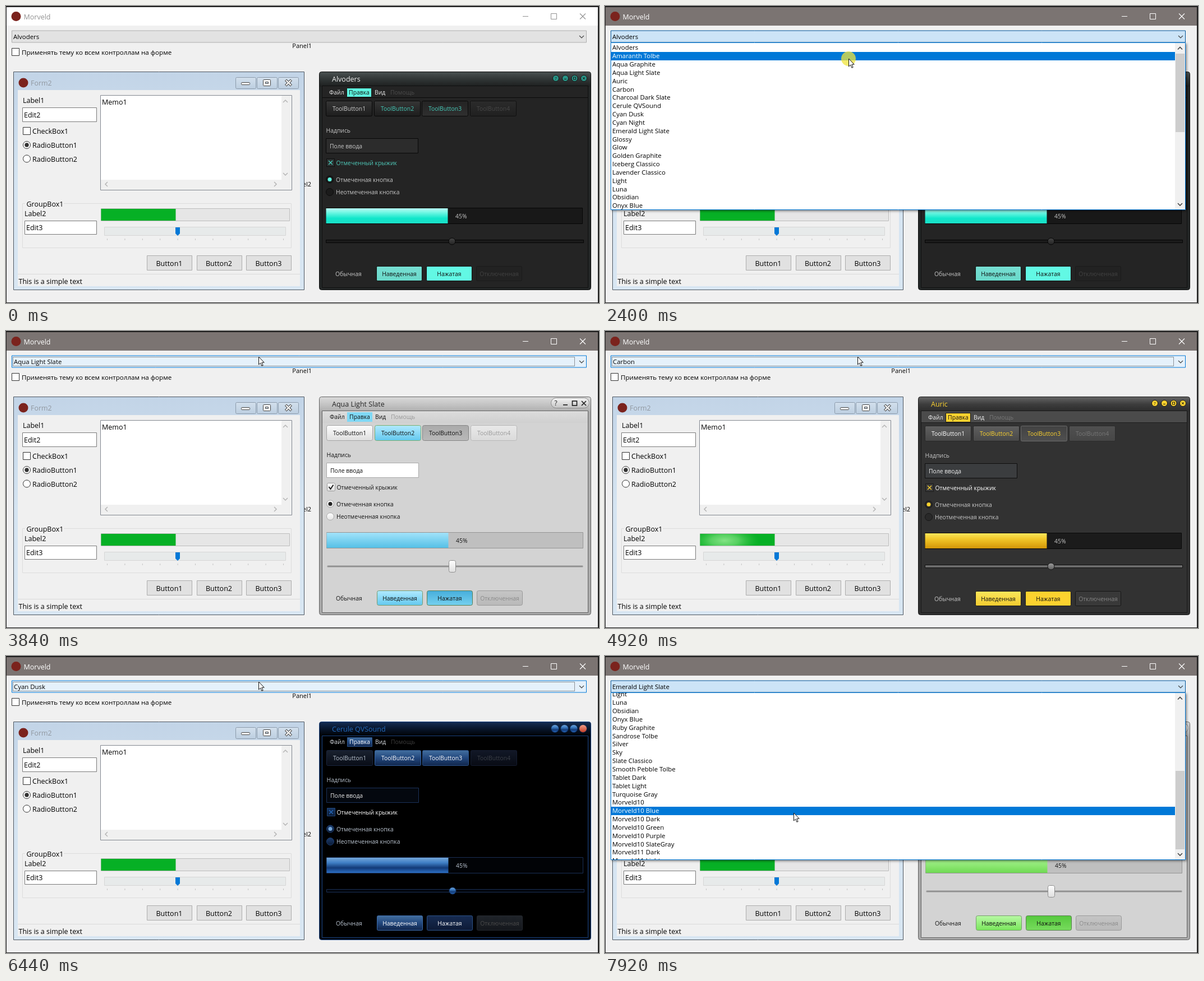
An HTML page with a canvas that plays this animation: 1057 px wide and 530 px high, repeating every 8000 ms.

```html
<!DOCTYPE html>
<html lang="ru">
<head>
<meta charset="utf-8">
<title>Theme preview</title>
<style>
html, body { margin: 0; width: 100%; height: 100%; overflow: hidden; background: #1c1c1c; }
canvas { display: block; width: 1057px; height: 530px; }
</style>
</head>
<body>
<canvas id="stage" width="1057" height="530"></canvas>
<script>
const ctx = document.getElementById('stage').getContext('2d');
const LOOP = 8000, TICK = 40, ROW = 14.84, LIST_TOP = 66.7;
const BLUE = '#0078d7';

const names = ['Alvoders', 'Amaranth Tolbe', 'Aqua Graphite', 'Aqua Light Slate', 'Auric', 'Carbon',
  'Charcoal Dark Slate', 'Cerule QVSound', 'Cyan Dusk', 'Cyan Night', 'Emerald Light Slate', 'Glossy',
  'Glow', 'Golden Graphite', 'Iceberg Classico', 'Lavender Classico', 'Light', 'Luna', 'Obsidian',
  'Onyx Blue', 'Ruby Graphite', 'Sandrose Tolbe', 'Silver', 'Sky', 'Slate Classico',
  'Smooth Pebble Tolbe', 'Tablet Dark', 'Tablet Light', 'Turquoise Gray', 'Morveld10',
  'Morveld10 Blue', 'Morveld10 Dark', 'Morveld10 Green', 'Morveld10 Purple', 'Morveld10 SlateGray',
  'Morveld11 Dark', 'Morveld11 Light'];

// ---- drawing helpers ----
function paint(fill, y, h) {
  if (!Array.isArray(fill)) return fill;
  const g = ctx.createLinearGradient(0, y, 0, y + h);
  fill.forEach((c, i) => g.addColorStop(i / (fill.length - 1), c));
  return g;
}
function box(x, y, w, h, fill, stroke, r = 0) {
  ctx.beginPath();
  if (stroke) ctx.roundRect(x + .5, y + .5, w - 1, h - 1, r);
  else ctx.roundRect(x, y, w, h, r);
  if (fill) { ctx.fillStyle = paint(fill, y, h); ctx.fill(); }
  if (stroke) { ctx.strokeStyle = stroke; ctx.lineWidth = 1; ctx.stroke(); }
}
function disc(x, y, r, fill, stroke) {
  ctx.beginPath();
  ctx.arc(x, y, r, 0, 7);
  if (fill) { ctx.fillStyle = paint(fill, y - r, 2 * r); ctx.fill(); }
  if (stroke) { ctx.strokeStyle = stroke; ctx.lineWidth = 1; ctx.stroke(); }
}
function lines(color, width, ...paths) {
  ctx.strokeStyle = color;
  ctx.lineWidth = width;
  ctx.beginPath();
  for (const p of paths)
    for (let i = 0; i < p.length; i += 2) ctx[i ? 'lineTo' : 'moveTo'](p[i], p[i + 1]);
  ctx.stroke();
}
// y is the middle of the capitals
function text(s, x, y, size, color, align = 'left') {
  ctx.font = `${size}px "Open Sans", "Noto Sans", sans-serif`;
  ctx.textAlign = align;
  ctx.fillStyle = color;
  ctx.fillText(s, x, y + size * .36);
}
function chevron(x, y, dx, dy, color, w = 1.2) {
  lines(color, w, dx ? [x - 2 * dx, y - 4, x + 2 * dx, y, x - 2 * dx, y + 4]
                     : [x - 4, y - 2 * dy, x, y + 2 * dy, x + 4, y - 2 * dy]);
}
function cross(x, y, r, color, w) {
  lines(color, w, [x - r, y - r, x + r, y + r], [x - r, y + r, x + r, y - r]);
}

// ---- themes: parts are [fill, border, text] ----
const graphite = (accent, fill, more) => ({
  o: 0, r: 2, frame: '#303030', edge: '#191919', bar: ['#646464', '#3c3c3c', '#2b2b2b'],
  bg: '#323232', menu: '#4b4b4b', line: '#1d1d1d', title: accent, sel: accent, selEdge: '#1b1b1b',
  selFg: '#111', fg: '#c6c6c6', menuFg: '#f0f0f0', checkFg: '#fff', dis: '#777',
  tools: [[['#5f5f5f', '#484848'], '#272727', '#fff'], [['#5f5f5f', '#484848'], '#272727', accent],
          [['#424242', '#505050'], '#6a6a6a', accent], [['#505050', '#464646'], '#2c2c2c', '#777']],
  edit: ['#3b3d3f', '#0e0e0e', '#eee'], chk: ['#3a3a3a', '#191919'], mark: accent, dot: accent,
  radio: ['#292929', '#171717'], track: ['#1b1b1b', '#080808'], fill,
  rail: ['#6c6c6c', '#111'], thumb: [['#9c9c9c', '#606060'], '#151515'], icons: 'dot', icon: accent,
  btns: [[fill.slice(0, 2), '#1b1b1b', '#111'], [accent, '#1b1b1b', '#111'], ['#393939', '#161616', '#858585']],
  ...more
});
const slate = (accent, hot, press, fill) => ({
  o: 1, r: 3, light: 1, frame: '#a9a9a9', edge: '#626262', bar: ['#d9d9d9', '#c4c4c4', '#adadad'],
  bg: '#d3d3d3', menu: ['#dcdcdc', '#d0d0d0'], line: '#cfcfcf', title: '#252525', sel: accent,
  selFg: '#111', fg: '#151515', menuFg: '#111', dis: '#999',
  tools: [[['#fdfdfd', '#dedede'], '#a5a5a5', '#111'], [hot, '#7aae6f', '#111'],
          [['#aaa', '#b9b9b9'], '#858585', '#111'], [['#e9e9e9', '#dadada'], '#b8b8b8', '#999']],
  edit: ['#fff', '#a9a9a9', '#111'], chk: [['#fff', '#ddd'], '#999'], mark: '#222', tick: 1, dot: '#222',
  radio: [['#fff', '#dadada'], '#a3a3a3'], track: ['#bfbfbf', '#959595'], fill,
  rail: ['#909090', '#b5b5b5'], thumb: [['#fff', '#dedede'], '#8d8d8d'], icons: 'pill', icon: '#222',
  btns: [[hot, '#769a6d', '#111'], [press, '#587e50', '#111'], [['#c5c5c5', '#b9b9b9'], '#999', '#8b8b8b']]
});
const night = (title, hot, fill, more) => ({
  o: 1, r: 2, frame: '#02060e', edge: '#1a427f', bar: ['#142c52', '#071428', '#000'], bg: '#000', menu: '#000',
  line: '#000', title, sel: hot, selEdge: '#28528c', selFg: '#fff', fg: '#b9c3cf', menuFg: '#d7dce2',
  checkFg: '#fff', dis: '#3c3c3c',
  tools: [[['#1a2230', '#080c16'], '#1b2640', '#b9c3cf'], [hot, '#33609f', '#fff'],
          [hot, '#2b528a', '#fff'], [['#121827', '#080b14'], '#151d30', '#3c4048']],
  edit: ['#04080f', '#1b325a', '#e6e6e6'], chk: [['#173663', '#0b1a33'], '#21477c'], mark: title, dot: fill[0],
  radio: [['#1c3c6c', '#0b1b36'], '#1c3d70'], track: ['#010306', '#1a2f55'], fill,
  rail: ['#02060d', '#1a2f55'], thumb: [fill, '#173a6c'], icons: 'orb', icon: fill,
  btns: [[hot, '#3c6cab', '#fff'], [['#172c52', '#0d1a36'], '#2c5288', '#fff'], [['#20242a', '#14171c'], '#24282e', '#4a4a4a']],
  ...more
});
const orange = ['#f09461', '#e67a42'];

const themes = [
  graphite('#5ef7e0', ['#b9fff5', '#62f5e0', '#10e6ca', '#1ce0c8'], {
    frame: '#232626', edge: '#0f1010', bar: ['#495050', '#303535', '#1d1f1f'], bg: '#242424', menu: '#242424',
    line: '#0b0b0b', title: '#f2f2f2', menuFg: '#e8e8e8', checkFg: '#4fc9b9', dis: '#4b4b4b',
    tools: [[['#363636', '#1d1d1d'], '#080808', '#ccc'], [['#363636', '#1d1d1d'], '#080808', '#46cbb9'],
            [['#232323', '#2f2f2f'], '#080808', '#46cbb9'], [['#2b2b2b', '#202020'], '#101010', '#484848']],
    edit: ['#2c2c2c', '#080808', '#c6c6c6'], chk: ['#2b3030', '#0d0d0d'], mark: '#46cbb9', radio: ['#1b1b1b', '#0c0c0c'],
    track: ['#181818', '#050505'], rail: ['#1b1b1b', '#050505'], thumb: [['#454545', '#232323'], '#050505'], icon: '#299486',
    btns: [[['#77ded2', '#69d9ca'], '#111', '#111'], ['#62f8e4', '#111', '#111'], ['#222', '#1b1b1b', '#424242']]
  }),
  {
    ...slate('#e97a42', orange, ['#ea8149', '#ee8f5c'], ['#ea8753', '#e87c45']),
    frame: '#2c305a', edge: '#1d2040', bar: ['#454a78', '#30355f', '#262a50'], bg: '#e6e9ef', menu: ['#eef0f5', '#d2d8e4'],
    line: '#c2c9d8', title: '#e8ebf6', selEdge: '#8e3c16', selFg: '#fff', dis: '#9a9ea8', label: '#4c4b82',
    tools: [[['#fff', '#edeff4'], '#c4c9d6', '#111'], [orange, '#b65a2b', '#111'],
            [['#c5cbde', '#d8ddea'], '#59628e', '#111'], [['#f6f7f9', '#eceff3'], '#c8cdd6', '#a2a5ac']],
    edit: ['#fff', '#a7aec2', '#111'], chk: [orange, '#a24b20'], mark: '#4a2513', dot: '#fff', radio: [orange, '#b45a2b'],
    track: ['#c9d0df', '#9aa3bd'], rail: ['#8491ad', '#bac4d6'], thumb: [['#fff', '#dce1ea'], '#7e8ba6'],
    icons: 'glyph', icon: '#d8dbea',
    btns: [[orange, '#a9542a', '#111'], [['#ea8149', '#ee8f5c'], '#8f431e', '#111'], ['#e6e9ef', '#bdc3cf', '#9a9ea8']]
  },
  graphite('#5cc4f2', ['#a3e2ff', '#56bdec', '#2389c4']),
  slate('#7fd8f5', ['#b2eaff', '#62c8ee'], ['#45addb', '#76d1ef'], ['#a2e3fa', '#55c0e6']),
  graphite('#fcd22f', ['#fbe75c', '#f2cb2e', '#e4b018', '#d2960a']),
  graphite('#d8d8d8', ['#dedede', '#b5b5b5', '#8c8c8c'], { bg: '#3e3e3e', frame: '#393939' }),
  graphite('#b5bcc4', ['#b9c0c8', '#949ca5', '#727a83'], { bg: '#4a4d50', frame: '#3a3d40', menu: '#56595c' }),
  night('#2469ba', ['#44709f', '#22477d', '#10254a'], ['#74a6d8', '#3f7fc5', '#123a77', '#2c6fc4']),
  night('#1d3c50', ['#8fe0f2', '#42b2cf'], ['#a1ecfa', '#46bfd9', '#2598b6'], {
    frame: '#788b99', edge: '#465966', bar: ['#a4b4bf', '#8498a6', '#758895'], bg: '#91a3b0', menu: '#9aabb7', line: '#788b99',
    fg: '#101a20', menuFg: '#101a20', checkFg: '#101a20', dis: '#6d7d88' }),
  night('#4fd0ea', ['#3f98ad', '#165265', '#0a2f3d'], ['#83e6f7', '#2ba6c3', '#10647c'], { bg: '#0c1820', menu: '#0c1820', frame: '#0a141b' }),
  slate('#98f07c', ['#b9f9a6', '#78e65a'], ['#55c83c', '#78dc5e'], ['#a9f492', '#8ee874', '#6fd953'])
];

// ---- timeline ----
const at = (keys, t) => keys.findLastIndex(k => t >= k);
const labelTimes = [0, 2480, 3280, 3840, 4360, 4920, 5200, 6080, 6440, 6760, 7080];
const themeTimes = [0, 2520, 3360, 3840, 4400, 4960, 5240, 6120, 6480, 6800, 7120];
const glowTimes = [840, 2920, 4920, 7080];
const clicks = [1080, 2400, 7280];
const path = [[200, 597, 385], [1000, 440, 66], [1080, 434, 51], [1760, 434, 51], [1920, 434, 94],
  [2520, 434, 94], [3000, 450, 46], [7400, 450, 46], [7680, 336, 280], [8000, 336, 280]];
const clamp = v => Math.max(0, Math.min(1, v));
const ease = v => v * v * (3 - 2 * v);

function pointer(t) {
  const i = at(path.map(p => p[0]), t);
  if (i < 0) return null;
  const [t0, x0, y0] = path[i], [t1, x1, y1] = path[i + 1];
  const k = ease((t - t0) / (t1 - t0));
  return { x: x0 + (x1 - x0) * k, y: y0 + (y1 - y0) * k };
}
function opening(t) {
  if (t >= 1240 && t < 2480) return clamp((t - 1200) / 240);
  return t >= 7360 ? clamp((t - 7320) / 200) : 0;
}

// ---- scene parts ----
function mainWindow(active, hoverCheck) {
  box(0, 0, 1057, 530, '#1c1c1c');
  box(1, 2, 1054, 527, '#f0f0f0');
  box(1, 2, 1054, 33, active ? '#7b7472' : '#fff');
  const c = active ? '#fff' : '#929292';
  disc(18, 18.5, 8.5, '#7b231d');
  text('Morveld', 31.5, 19, 12.5, c);
  lines(c, 1, [921, 18.5, 931, 18.5]);
  box(971, 13, 11, 11, null, c);
  cross(1028, 18.5, 5, c, 1.1);
  box(10, 75, 14, 14, '#fff', hoverCheck ? BLUE : '#333');
  text('Применять тему ко всем контроллам на форме', 28, 83, 11.6, '#000');
  text('Panel1', 545, 71, 11, '#000', 'right');
  text('Panel2', 544, 318, 11, '#000', 'right');
}

function combo(label, state, focus) {
  const look = { idle: ['#e2e2e2', '#adadad'], hover: ['#e5f1fb', BLUE], open: ['#cce4f7', '#005499'] }[state];
  box(10, 43.5, 1025, 22, ...look);
  if (focus) {
    ctx.setLineDash([1, 1]);
    box(12, 46, 1002, 17, null, '#333');
    ctx.setLineDash([]);
  }
  text(label, focus ? 14 : 13, 55, 11.4, '#000');
  chevron(1026, 55, 0, 1, '#444');
}

function form(t) {
  box(13, 117, 519, 390, ['#c2d4e7', '#d5e4f1', '#d8e6f2'], '#4d5660');
  box(21, 150, 503, 350, '#f0f0f0');
  disc(31, 137, 8.5, '#7b231d');
  text('Form2', 44, 138, 12.4, '#9198a0');
  for (const x of [409, 447, 485]) box(x, 127, 37, 21, ['#d3e0ed', '#bccee0'], '#8c9bab', 2);
  box(419, 136, 16, 5, '#fff', '#444', 1);
  box(458, 131, 14, 12, '#fff', '#444', 1);
  box(462, 135, 6, 4, '#ccd8e4', '#444');
  cross(503.5, 137, 5, '#444', 4.5);
  cross(503.5, 137, 4.5, '#fff', 2.4);

  const label = (s, x, y, align) => text(s, x, y, 12.5, '#000', align);
  label('Label1', 30, 168);
  box(29, 181, 133, 26, '#fff', '#7a7a7a');
  label('Edit2', 32, 194);
  box(30, 216, 14, 14, '#fff', '#333');
  label('CheckBox1', 47, 223);
  disc(37, 248, 6.5, '#fff', '#333');
  disc(37, 248, 3.7, '#333');
  label('RadioButton1', 47, 248);
  disc(37, 272.5, 6.5, '#fff', '#333');
  label('RadioButton2', 47, 273);

  box(168, 159, 342, 170, '#fff', '#828790');
  box(491, 160, 18, 168, '#f0f0f0');
  box(169, 310, 340, 18, '#f0f0f0');
  label('Memo1', 171, 171);
  chevron(498, 170, 0, -1, '#b5b5b5', 1.5);
  chevron(498, 300, 0, 1, '#b5b5b5', 1.5);
  chevron(179, 318, -1, 0, '#b5b5b5', 1.5);
  chevron(480, 318, 1, 0, '#b5b5b5', 1.5);

  box(29, 352, 480, 80, null, '#dcdcdc');
  box(34, 348, 69, 10, '#f0f0f0');
  label('GroupBox1', 36.5, 353);
  label('Label2', 33, 370);
  box(33, 383, 129, 25, '#fff', '#7a7a7a');
  label('Edit3', 36, 395);
  progress(t);
  box(175, 394, 324, 16, '#e7eaea', '#d6d6d6');
  for (let i = 0; i < 11; i++) box(180 + i * 31.4, 415, 1, 3, '#c4c4c4');
  ctx.fillStyle = BLUE;
  ctx.beginPath();
  for (const [x, y] of [[302, 395], [310, 395], [310, 406], [306, 410], [302, 406]]) ctx.lineTo(x, y);
  ctx.fill();
  ['Button1', 'Button2', 'Button3'].forEach((s, i) => {
    const x = 251 + i * 88.5;
    box(Math.round(x), 445, 81, 27, '#e1e1e1', '#adadad');
    label(s, x + 40, 459, 'center');
  });
  lines('#d9d9d9', 1, [21, 478.5, 524, 478.5]);
  label('This is a simple text', 22.5, 491);
}

function progress(t) {
  box(169, 361, 337, 23, '#e6e6e6', '#bcbcbc');
  box(169.5, 362, 133, 21, '#06b025');
  ctx.save();
  ctx.beginPath();
  ctx.rect(169.5, 362, 133, 21);
  ctx.clip();
  for (const g of glowTimes) {
    const x = 213 + (t - g) * .3;
    if (x < 90 || x > 380) continue;
    ctx.save();
    ctx.translate(x, 374);
    ctx.scale(1, .4);
    const light = ctx.createRadialGradient(0, 0, 0, 0, 0, 62);
    light.addColorStop(0, 'rgba(138,230,138,.95)');
    light.addColorStop(.4, 'rgba(120,222,122,.7)');
    light.addColorStop(1, 'rgba(60,195,70,0)');
    ctx.fillStyle = light;
    ctx.fillRect(-70, -70, 140, 140);
    ctx.restore();
  }
  ctx.restore();
}

function icons(s) {
  const c = s.icon;
  if (s.icons === 'pill') box(971, 119, 69, 19, ['#f6f6f6', '#c2c2c2'], '#8d8d8d', 9);
  [980, 997, 1013.5, 1030].forEach((x, i) => {
    if (s.icons === 'orb') return disc(x - 1.5, 129.5, 7, i === 3 ? ['#f0a08c', '#c73d25'] : c, '#0b2044');
    const small = s.icons === 'dot', r = small ? 2 : 4, ink = small ? '#151515' : c;
    if (small) disc(x, 129, 5.5, c, '#161616');
    const w = small ? 1 : 1.7;
    if (i === 0) text('?', x, 129, small ? 8 : 12, ink, 'center');
    if (i === 1) lines(ink, w, [x - r, 129 + r * .7, x + r, 129 + r * .7]);
    if (i === 2) { ctx.strokeStyle = ink; ctx.lineWidth = w; ctx.strokeRect(x - r, 129 - r, 2 * r, 2 * r); }
    if (i === 3) cross(x, 129, r, ink, w);
  });
}

function panel(s, name) {
  box(558, 117, 485, 390, s.frame, s.edge, 4);
  box(559, 118, 483, 26, s.bar, null, [4, 4, 0, 0]);
  box(563, 142, 475, 361, s.bg, s.edge);
  box(564, 143, 473, 20, s.menu);
  lines(s.line, 1, [564, 163.5, 1037, 163.5]);
  text(name, 581, 130, 12.5, s.title);
  icons(s);
  ctx.save();
  ctx.translate(s.o, -s.o);
  const label = (str, x, y, color = s.fg, align) => text(str, x, y, 10.4, color, align);
  const button = (str, x, y, w, h, [fill, border, fg]) => {
    box(x, y, w, h, fill, border, s.r);
    label(str, x + w / 2, y + h / 2 + .5, fg, 'center');
  };
  box(607, 146, 45, 17, s.sel, s.selEdge);
  label('Файл', 576, 154, s.menuFg);
  label('Правка', 629.5, 154, s.selFg, 'center');
  label('Вид', 657, 154, s.menuFg);
  label('Помощь', 685, 154, s.dis);
  s.tools.forEach((b, i) => button('ToolButton' + (i + 1), Math.round(570 + i * 85.7), 169, 83, 28, b));

  label('Надпись', 570.5, 222, s.label);
  box(570, 236, 165, 27, s.edit[0], s.edit[1]);
  label('Поле ввода', 577, 250, s.edit[2]);
  box(571, 272, 15, 15, ...s.chk, s.light ? 2 : 0);
  if (s.tick) lines(s.mark, 2, [574.5, 279, 577.5, 283, 582.5, 275.5]);
  else cross(578.5, 279.5, 3.5, s.mark, 1.3);
  label('Отмеченный крыжик', 588.5, 280, s.checkFg);
  disc(577, 309.5, 6.5, ...s.radio);
  disc(577, 309.5, 3.5, s.dot);
  label('Отмеченная кнопка', 588, 310);
  disc(577, 332, 6.5, ...(s.light ? [['#fff', '#e4e4e4'], '#aaa'] : s.radio));
  label('Неотмеченная кнопка', 588, 332);

  box(570, 360, 458, 29, ...s.track);
  box(570.5, 361, 217, 27, s.fill);
  label('45%', 801, 375);
  if (s.light) {
    box(571, 419, 457, 4, ...s.rail, 2);
    box(788, 410, 13, 22, ...s.thumb, 3);
  } else {
    box(570, 417, 460, 6, ...s.rail);
    disc(795, 420, 6, ...s.thumb);
  }
  label('Обычная', 587, 478);
  ['Наведенная', 'Нажатая', 'Отключенная'].forEach((str, i) =>
    button(str, Math.round(659.5 + i * 89.3), 464, 82, 27, s.btns[i]));
  ctx.restore();
}

function dropdown(open, scroll, selected) {
  const h = 299 * open;
  ctx.save();
  ctx.shadowColor = 'rgba(0,0,0,.45)';
  ctx.shadowBlur = 4;
  ctx.shadowOffsetX = ctx.shadowOffsetY = 2;
  box(10, 65, 1025, h, '#fff');
  ctx.restore();
  ctx.save();
  ctx.beginPath();
  ctx.rect(11, 66, 1023, h - 2);
  ctx.clip();
  ctx.translate(0, h - 299);
  names.forEach((name, i) => {
    const y = LIST_TOP + i * ROW - scroll;
    if (i === selected) box(11, Math.round(y), 1005, 15, BLUE);
    text(name, 13, y + 7.5, 11.4, i === selected ? '#fff' : '#000');
  });
  box(1016, 66, 18, 297, '#f0f0f0');
  box(1017, 85 + scroll * .493, 16, 140, '#cdcdcd');
  chevron(1025, 75.5, 0, -1, '#444', 1.6);
  chevron(1025, 354, 0, 1, '#444', 1.6);
  ctx.restore();
  box(10, 65, 1025, h, null, BLUE);
}

function arrow({ x, y }) {
  ctx.save();
  ctx.translate(x + .5, y);
  ctx.beginPath();
  for (const p of [[0, 0], [0, 14], [3.2, 11], [5.4, 16.3], [7.6, 15.4], [5.4, 10.2], [9.7, 10.2]]) ctx.lineTo(...p);
  ctx.closePath();
  ctx.fillStyle = '#fff';
  ctx.fill();
  ctx.strokeStyle = '#111';
  ctx.lineWidth = 1;
  ctx.stroke();
  ctx.restore();
}

function draw(t) {
  const cur = pointer(t), open = opening(t);
  const label = at(labelTimes, t), theme = at(themeTimes, t);
  const onCheck = !!cur && !open && cur.y > 70 && cur.y < 96;
  const onCombo = !!cur && cur.y < 66;

  mainWindow(t >= 1080, onCheck);
  combo(names[label], open ? 'open' : onCombo || t >= 2480 ? 'hover' : 'idle', t >= 3280 && !open);
  form(t);
  panel(themes[theme], names[theme]);
  if (open) {
    const scroll = t > 7000 ? 243.3 * ease(clamp((t - 7640) / 280)) : 0;
    const row = cur.y > LIST_TOP ? Math.floor((cur.y - LIST_TOP + scroll) / ROW) : label;
    dropdown(open, scroll, row);
  }
  if (!cur) return;
  if (clicks.some(c => t >= c && t < c + 120)) disc(cur.x, cur.y, 13, 'rgba(240,228,60,.75)');
  arrow(cur);
}

function tick() {
  draw(Math.floor(performance.now() % LOOP / TICK) * TICK);
  requestAnimationFrame(tick);
}
tick();
</script>
</body>
</html>
```
